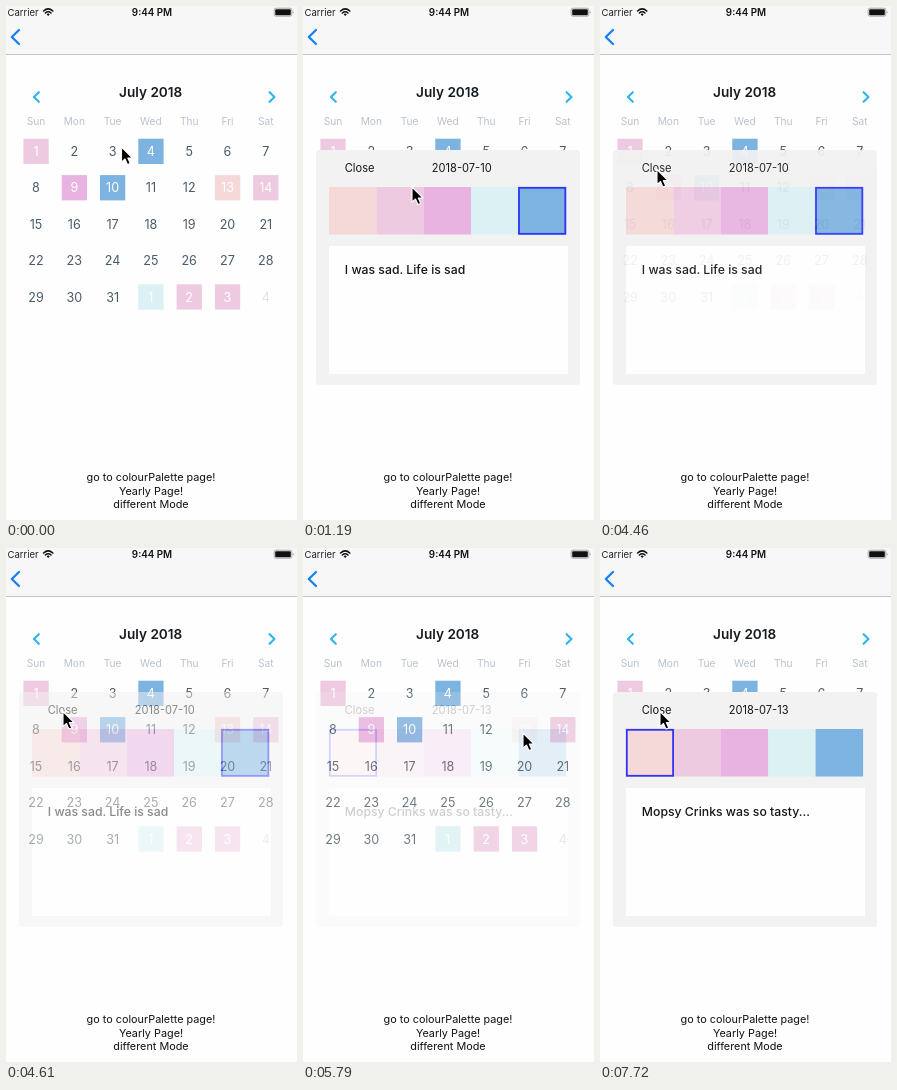
Write an HTML page that moves like this. It is 291 px wide and 514 px high and loops after 8000 ms.

```html
<!DOCTYPE html>
<html lang="en">
<head>
<meta charset="utf-8">
<title>Mood calendar</title>
<style>
  html, body { margin: 0; width: 100%; height: 100%; overflow: hidden; background: #fff; }
  svg { display: block; width: 100%; height: 100%; font-family: Inter, Roboto, "Liberation Sans", sans-serif; }
  text { dominant-baseline: alphabetic; }
  .mid { text-anchor: middle; }
  .line { fill: none; stroke-linecap: round; stroke-linejoin: round; }
</style>
</head>
<body>
<svg id="stage" viewBox="0 0 291 514" preserveAspectRatio="none">
  <rect width="291" height="514" fill="#fefefe"/>
  <g id="header">
    <rect width="291" height="48" fill="#f7f7f7"/>
    <rect y="48" width="291" height="1" fill="#c4c4c6"/>
    <text x="1.5" y="9.6" font-size="9.5" fill="#222">Carrier</text>
    <g class="line" stroke="#111" stroke-width="1.6" stroke-linecap="butt">
      <path d="M37.6 5 Q42.2 0.8 46.8 5"/>
      <path d="M39.4 7 Q42.2 4.5 45 7"/>
    </g>
    <path d="M40.6 8.2 Q42.2 7 43.8 8.2 L42.2 10Z" fill="#111"/>
    <text class="mid" x="146" y="9.8" font-size="9.8" font-weight="600" fill="#111">9:44 PM</text>
    <rect x="268.2" y="2.2" width="17.6" height="8" rx="1.8" fill="none" stroke="#888" stroke-width=".7"/>
    <rect x="269.2" y="3.2" width="15.6" height="6" rx="1" fill="#111"/>
    <path d="M286.8 5 Q288.6 6.2 286.8 7.5Z" fill="#777"/>
    <path class="line" d="M13 24 L5.8 31 L13 38" stroke="#1480fb" stroke-width="2.3"/>
  </g>
  <g id="calendar">
    <text class="mid" x="144.7" y="91" font-size="13.6" font-weight="600" fill="#161b20">July 2018</text>
    <g class="line" stroke="#2db4ef" stroke-width="2.1" stroke-linecap="butt" stroke-linejoin="miter">
      <path d="M32.8 86.2 L27.9 91 L32.8 95.8"/>
      <path d="M263.6 86.2 L268.5 91 L263.6 95.8"/>
    </g>
  </g>
  <g id="links" class="mid" font-size="10.85" fill="#111">
    <text x="145" y="475">go to colourPalette page!</text>
    <text x="145" y="488.5">Yearly Page!</text>
    <text x="145" y="502">different Mode</text>
  </g>
  <g id="popup">
    <rect x="13" y="144" width="264" height="235" rx="3.5" fill="#f2f2f2"/>
    <g fill="#161616" font-size="11.1">
      <text x="41.7" y="166.2">Close</text>
      <text id="date" x="128.8" y="166.2"></text>
    </g>
    <g id="swatches"></g>
    <rect id="choice" y="181.8" width="46.3" height="46" fill="none" stroke="#3034f4" stroke-width="1.8"/>
    <rect x="26" y="240" width="239" height="128" fill="#fefefe"/>
    <text id="note" x="41.8" y="268.4" font-size="12.25" font-weight="500" fill="#161616"></text>
  </g>
  <path id="cursor" d="M0 0 V15.2 L3.5 12 L6 17.6 L8.7 16.4 L6.3 11 H11Z"
        fill="#000" stroke="#fff" stroke-width="1.1" stroke-linejoin="round"/>
</svg>
<script>
const LOOP = 8000, TICK = 148.6;
const PEACH = '#f5d8d8', ROSE = '#eecae0', ORCHID = '#e8b3e0', AQUA = '#dbf1f4', BLUE = '#7db3e0';
const PALETTE = [PEACH, ROSE, ORCHID, AQUA, BLUE];
// Moods by grid position; days past 31 belong to August.
const MOODS = { 1: ROSE, 4: BLUE, 9: ORCHID, 10: BLUE, 13: PEACH, 14: ROSE, 32: AQUA, 33: ROSE, 34: ROSE };

const byId = id => document.getElementById(id);
function add(parent, tag, attrs, text) {
  const el = document.createElementNS('http://www.w3.org/2000/svg', tag);
  for (const name in attrs) el.setAttribute(name, attrs[name]);
  if (text !== undefined) el.textContent = text;
  return parent.appendChild(el);
}

const calendar = byId('calendar'), popup = byId('popup'), cursor = byId('cursor');
const cells = {};
const columnX = i => 30 + i * 38.3;

['Sun', 'Mon', 'Tue', 'Wed', 'Thu', 'Fri', 'Sat'].forEach((name, i) =>
  add(calendar, 'text', { class: 'mid', x: columnX(i), y: 119, 'font-size': 10.2, fill: '#b8c2cd' }, name));

for (let day = 1; day <= 35; day++) {
  const x = columnX((day - 1) % 7), y = 145.3 + Math.floor((day - 1) / 7) * 36.4;
  const cell = cells[day] = add(calendar, 'g', {});
  const mood = MOODS[day];
  if (mood) add(cell, 'rect', { x: x - 12.6, y: y - 12.6, width: 25.3, height: 25.3, fill: mood });
  add(cell, 'text', {
    class: 'mid', x, y: y + 4.6, 'font-size': 12.6,
    fill: mood ? '#fff' : day > 31 ? '#dce3e9' : '#4b5b68'
  }, day > 31 ? day - 31 : day);
}

PALETTE.forEach((fill, i) =>
  add(byId('swatches'), 'rect', { x: 26 + i * 47.4, y: 181, width: 47.5, height: 47.5, fill }));

const ENTRIES = [
  { day: 10, date: '2018-07-10', note: 'I was sad. Life is sad', color: 4, opens: 3.8, closes: 29.5 },
  { day: 13, date: '2018-07-13', note: 'Mopsy Crinks was so tasty...', color: 0, opens: 37.8, closes: Infinity }
];

// Pointer path: tick, x, y
const PATH = [
  [0, 115.5, 141], [1, 114, 150], [3, 109, 181], [14, 109, 181], [15, 104, 178],
  [16, 80, 170], [17, 63, 165], [18, 57, 164], [19, 57, 164], [20, 57, 163.5],
  [32, 57, 163.5], [34, 125, 118], [36, 212, 172], [37, 220, 185], [46, 220, 185],
  [47, 214, 185], [48, 92, 164], [49, 92, 164], [50, 72, 163], [51, 61, 163], [52, 60, 163.5]
];

function pointAt(tick) {
  const next = PATH.findIndex(p => p[0] > tick);
  if (next < 0) return PATH[PATH.length - 1].slice(1);
  const [t0, x0, y0] = PATH[next - 1], [t1, x1, y1] = PATH[next];
  const f = (tick - t0) / (t1 - t0);
  return [x0 + (x1 - x0) * f, y0 + (y1 - y0) * f];
}

function smooth(v) {
  const c = Math.min(1, Math.max(0, v));
  return c * c * (3 - 2 * c);
}

function render(ms) {
  const tick = Math.floor((ms + 10) / TICK);
  const entry = ENTRIES[tick < 37 ? 0 : 1];

  popup.setAttribute('opacity', smooth((tick - entry.opens) / 4.2) * (1 - smooth((tick - entry.closes) / 3)));
  byId('date').textContent = entry.date;
  byId('note').textContent = entry.note;
  byId('choice').setAttribute('x', 26.8 + entry.color * 47.3);

  for (const { day, opens } of ENTRIES) {
    const pressed = tick > opens && tick < opens + 2;
    cells[day].setAttribute('opacity', pressed ? 0.2 : 1);
  }
  cursor.setAttribute('transform', `translate(${pointAt(tick)})`);
}

const start = performance.now();
function loop() {
  render((performance.now() - start) % LOOP);
  requestAnimationFrame(loop);
}
loop();
</script>
</body>
</html>
```
